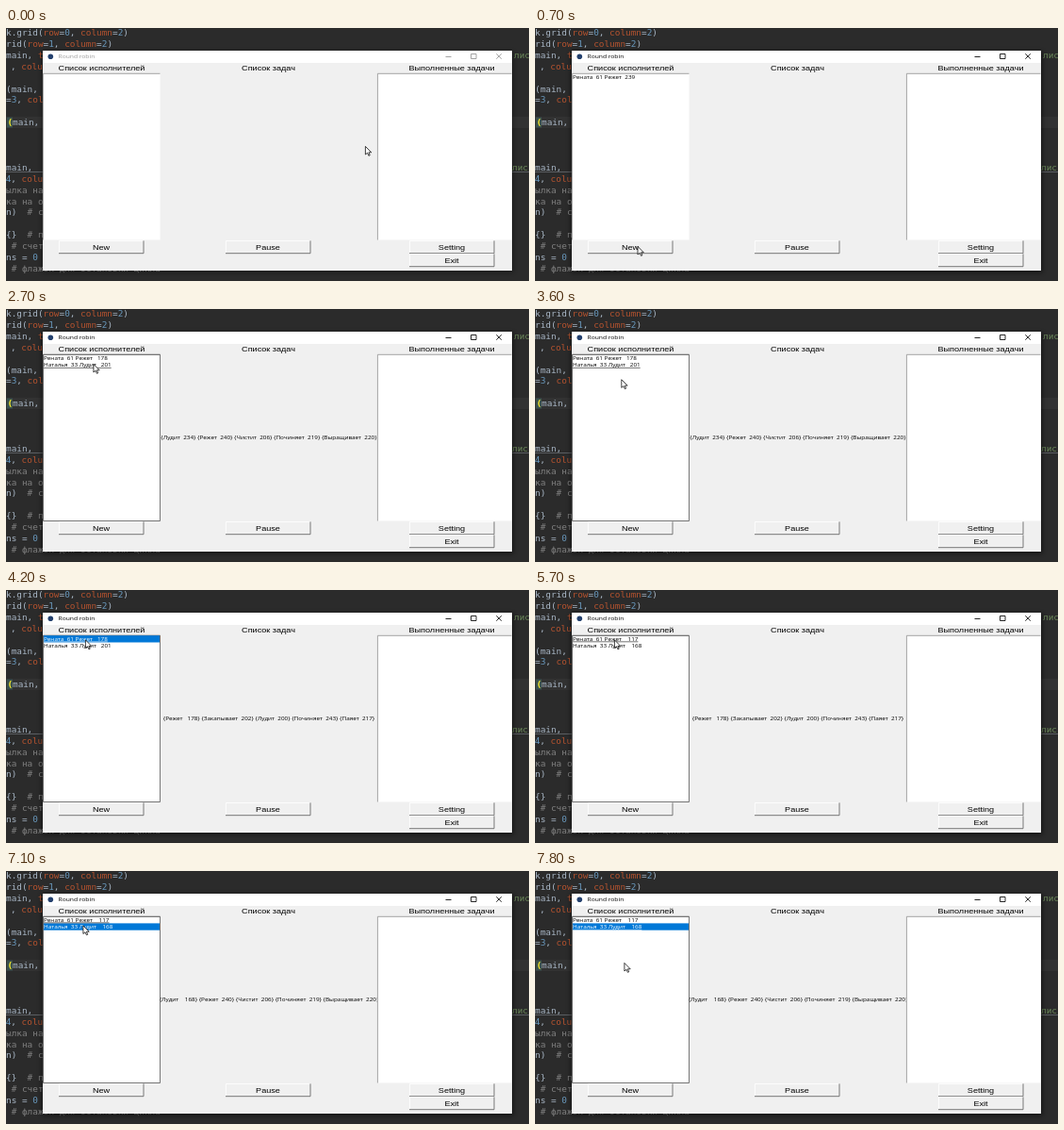
Recreate the animation shown at these times as an HTML page. Size 555 by 268 pixels, loop 8000 ms.

```html
<!DOCTYPE html>
<html lang="ru">
<head>
<meta charset="utf-8">
<title>Round robin</title>
<style>
  html, body { margin: 0; width: 100%; height: 100%; overflow: hidden; background: #2b2b2b; }
  svg { display: block; width: 555px; height: 268px; }
  text { white-space: pre; }
  .code { font: 9.4px "DejaVu Sans Mono", monospace; fill: #a9b7c6; }
  .ui { font: 9.1px "Liberation Sans", Arial, sans-serif; text-anchor: middle; fill: #000; }
  .small { font: 6.35px "Open Sans", "Noto Sans", sans-serif; fill: #000; }
  .title { font-size: 6.7px; }
  .task { text-anchor: middle; }
  .kw { fill: #b5532f; } .num { fill: #6897bb; } .note { fill: #808080; } .str { fill: #6a8759; }
  .brace { fill: #ffef28; font-weight: bold; }
  .active { text-decoration: underline; }
  .selected { fill: #fff; }
</style>
</head>
<body>
<svg viewBox="0 0 555 268" xmlns="http://www.w3.org/2000/svg">
  <defs>
    <clipPath id="taskClip"><rect x="163.5" y="128" width="230" height="16"/></clipPath>
    <filter id="blur" x="-10%" y="-10%" width="120%" height="120%"><feGaussianBlur stdDeviation="2.5"/></filter>
  </defs>
  <rect width="555" height="268" fill="#2b2b2b"/>
  <rect y="94" width="555" height="12" fill="#323232"/>
  <rect x="1" y="94.5" width="6" height="11" fill="#3b514d"/>
  <g id="code"></g>
  <path d="M0 152.5H555" stroke="#70757a" stroke-width=".7"/>
  <rect id="shadow" x="38" y="25" width="500" height="234" opacity=".4" filter="url(#blur)"/>
  <rect x="39" y="24" width="498" height="233" fill="#f0f0f0"/>
  <rect x="39" y="24" width="498" height="13" fill="#fff"/>
  <circle cx="47.3" cy="30.3" r="2.8" fill="#23406e"/>
  <g id="caption" fill="none" stroke-width=".9">
    <path d="M466.5 30.5h6M493.5 27.5h5.5v5h-5.5zM520.3 27.3l5.6 5.4m0-5.4l-5.6 5.4"/>
  </g>
  <g id="frames"></g>
  <path id="focus" d="M39.5 48.3H163.5V224.5H39.5Z" fill="none" stroke="#555" stroke-width=".8"/>
  <g id="buttons"></g>
  <rect id="bar" x="40" width="123" height="7.3" fill="#0078d7"/>
  <g id="labels"></g>
  <g clip-path="url(#taskClip)" id="taskBox"></g>
  <path id="cursor" d="M.4.4V9L2.5 7.3 3.9 10.3 5.2 9.8 3.9 6.8H6.7Z" fill="#fff" stroke="#000" stroke-width=".75"/>
</svg>
<script>
const LOOP = 8000, STEP = 100;
const $ = id => document.getElementById(id);

function add(parent, name, attrs) {
  const el = document.createElementNS("http://www.w3.org/2000/svg", name);
  for (const key in attrs) el.setAttribute(key, attrs[key]);
  return $(parent).appendChild(el);
}
function label(parent, cls, x, y, value = "") {
  const el = add(parent, "text", { class: cls, transform: `translate(${x} ${y}) scale(1 .87)` });
  el.textContent = value;
  return el;
}

// Editor behind the window: [x, line number, source line]
const paint = line => line
  .replace(/(#.*)|\b(row|column|colu|text)\b|(\d)/g, (all, note, kw) =>
    `<tspan class="${note ? "note" : kw ? "kw" : "num"}">${all}</tspan>`);
[
  [0, 0, "k.grid(row=0, column=2)"], [0, 1, "rid(row=1, column=2)"],
  [0, 2, "main, text"], [5, 3, ", colu"], [0, 5, "(main,"], [0, 6, "=3, colu"],
  [7, 8, "main,"], [0, 12, "main,"], [-6, 13, "=4, colu"],
  [0, 14, "#ылка на с"], [0, 15, "#ка на об"], [0, 16, "n)  # с"],
  [0, 18, "{}  # п"], [0, 19, " # счетч"], [0, 20, "ns = 0"],
  [0, 21, " # флажок для остановки цикла"]
].forEach(([x, row, line]) => {
  const el = label("code", "code", x, 8 + row * 11.9);
  el.innerHTML = /^#/.test(line) ? `<tspan class="note">${line.slice(1)}</tspan>` : paint(line);
});
label("code", "code brace", 1.5, 103.2, "(");
label("code", "code str", 539, 31.8, "лист");
label("code", "code str", 537, 150.8, "лист");

// Window contents
for (const [x, w] of [[39, 124.5], [394, 142.5]]) {
  add("frames", "rect", { x, y: 48, width: w, height: 176.5, fill: "#fff" });
  add("frames", "path", { d: `M${x + .4} 224.5V48.3H${x + w}`, fill: "none", stroke: "#8c8c8c", "stroke-width": .8 });
}
[[101, 225, "New"], [278, 225, "Pause"], [473, 225, "Setting"], [473, 239, "Exit"]].forEach(([cx, y, name]) => {
  const line = (d, stroke) => add("buttons", "path", { d, stroke, fill: "none", "stroke-width": .9 });
  line(`M${cx - 44.6} ${y + 13.5}V${y + .5}h90`, "#fff");
  line(`M${cx - 45} ${y + 13.7}h90v-13.4`, "#696969");
  label("buttons", "ui", cx, y + 10, name);
});
label("labels", "ui", 101.5, 45, "Список исполнителей");
label("labels", "ui", 278.5, 45, "Список задач");
label("labels", "ui", 473, 45, "Выполненные задачи");
const title = label("labels", "small title", 55.5, 32.4, "Round robin");
const rows = [53.7, 61].map(y => label("labels", "small", 40, y));
const task = label("taskBox", "small task", 279, 138.2);

// Cursor stops: [time, x, y]
const path = [
  [0, 381, 125], [400, 112, 231], [800, 108, 231], [900, 109, 232], [1000, 125, 250], [1300, 251, 148],
  [1700, 251, 148], [2300, 92.5, 58], [3300, 92.5, 58], [3500, 94, 82], [3800, 84, 52.5],
  [6000, 84, 52.5], [6200, 92.5, 89], [6500, 92.5, 89], [7000, 81.5, 57.5],
  [7500, 81.5, 57.5], [7800, 94.5, 97], [LOOP, 94.5, 97]
];
function cursorAt(t) {
  const i = path.findIndex(p => p[0] > t);
  const [t0, x0, y0] = path[i - 1], [t1, x1, y1] = path[i];
  const u = (t - t0) / (t1 - t0), e = u * u * (3 - 2 * u);
  return [x0 + (x1 - x0) * e, y0 + (y1 - y0) * e];
}

const renata = "Рената  61 Режет", natalia = "Наталья  33 Лудит";
const cutting = "{Режет   178} {Закапывает  202} {Лудит  200} {Починяет  243} {Паяет  217}";
const tinning = left => `{Лудит${left}} {Режет  240} {Чистит  206} {Починяет  219} {Выращивает  220}`;

// Each change is merged into the state before it.
const changes = [
  [0, { focused: false, listFocus: false, rows: ["", ""], selected: -1, active: -1, task: "" }],
  [500, { focused: true, rows: [renata + "  239", ""] }],
  [800, { rows: [renata + "  239", natalia + "  234"] }],
  [2700, { listFocus: true, active: 1, task: tinning("  234"), rows: [renata + "   178", natalia + "   201"] }],
  [4100, { selected: 0, task: cutting }],
  [4200, { active: 0 }],
  [5700, { selected: -1, rows: [renata + "    117", natalia + "    168"] }],
  [7100, { selected: 1, task: tinning("    168") }],
  [7200, { active: 1 }]
];

function draw(now) {
  const t = Math.floor(now % LOOP / STEP) * STEP;
  const s = Object.assign({}, ...changes.filter(c => c[0] <= t).map(c => c[1]));
  rows.forEach((el, i) => {
    el.textContent = s.rows[i];
    el.setAttribute("class", "small" + (s.selected === i ? " selected" : "") + (s.active === i ? " active" : ""));
  });
  task.textContent = s.task;
  title.style.fill = s.focused ? "#000" : "#999";
  $("caption").setAttribute("stroke", s.focused ? "#111" : "#999");
  $("shadow").setAttribute("opacity", s.focused ? .55 : .35);
  $("focus").setAttribute("visibility", s.listFocus ? "visible" : "hidden");
  $("bar").setAttribute("visibility", s.selected < 0 ? "hidden" : "visible");
  $("bar").setAttribute("y", 48.2 + 7.2 * Math.max(0, s.selected));
  $("cursor").setAttribute("transform", `translate(${cursorAt(t)})`);
  requestAnimationFrame(draw);
}
draw(performance.now());
</script>
</body>
</html>
```
